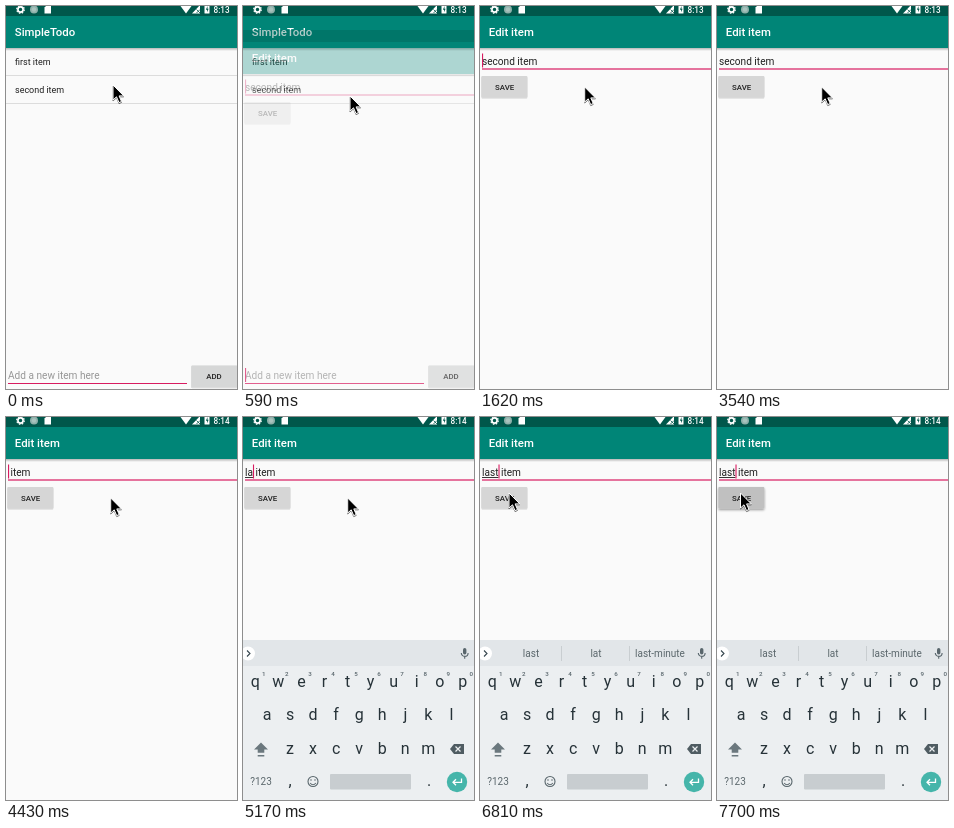
An HTML page for the animation above (8 s loop, 231 by 383 pixels).

```html
<!DOCTYPE html>
<html lang="en">
<head>
<meta charset="utf-8">
<title>Todo list demo</title>
<style>
  html, body { margin: 0; width: 100%; height: 100%; overflow: hidden; background: #fafafa; }
  svg { display: block; width: 231px; height: 383px; }
  text { font-family: Roboto, sans-serif; fill: #212121; white-space: pre; }
  .title { font-size: 11.4px; font-weight: 500; fill: #fff; }
  .row { font-size: 8.98px; }
  .field { font-size: 10.1px; }
  .hint { fill: #979797; }
  .label { font-size: 7.86px; font-weight: 500; text-anchor: middle; }
  .clock { font-size: 8.2px; font-weight: 500; fill: #fff; }
  .key { font-size: 16px; fill: #263238; text-anchor: middle; }
  .digit { font-size: 6.2px; font-weight: 500; fill: #59666c; text-anchor: middle; }
  .word { font-size: 10px; fill: #5b676c; text-anchor: middle; }
  .accent { fill: #d81b60; }
  .icon { fill: none; stroke: #59666c; stroke-width: 1.1; }
</style>
</head>
<body>
<svg viewBox="0 0 231 383">
  <defs>
    <linearGradient id="fade" x2="0" y2="1">
      <stop stop-color="#000" stop-opacity=".27"/>
      <stop offset="1" stop-color="#000" stop-opacity="0"/>
    </linearGradient>
    <filter id="lift" x="-20%" y="-20%" width="140%" height="160%">
      <feDropShadow dx="0" dy=".6" stdDeviation=".7" flood-opacity=".28"/>
    </filter>
    <filter id="lifted" x="-20%" y="-20%" width="140%" height="170%">
      <feDropShadow dx="0" dy="1.4" stdDeviation="1.2" flood-opacity=".42"/>
    </filter>
    <g id="bars">
      <rect y="-2" width="231" height="400" fill="#fafafa"/>
      <rect y="42" width="231" height="3" fill="url(#fade)"/>
      <rect y="10" width="231" height="32" fill="#008577"/>
      <rect y="-2" width="231" height="12" fill="#00574b"/>
    </g>
  </defs>

  <g id="list">
    <use href="#bars"/>
    <text class="title" x="8.8" y="30">SimpleTodo</text>
    <rect id="press" y="70" width="231" height="27" opacity="0"/>
    <text class="row" x="9" y="59">first item</text>
    <text class="row" x="9" y="87">second item</text>
    <path d="M0 69.5H231M0 97.5H231" stroke="#dcdcdc"/>
    <text class="field hint" x="2" y="372.7">Add a new item here</text>
    <rect class="accent" x="2" y="377" width="179" height="1"/>
    <rect class="accent" id="listCaret" x="2" y="362" width="1.1" height="14"/>
    <rect x="185.300" y="359.600" width="46" height="21.600" rx="1" fill="#d6d7d7" filter="url(#lift)"/>
    <text class="label" x="208" y="372.800">ADD</text>
  </g>

  <g id="edit">
    <use href="#bars"/>
    <text class="title" x="8.8" y="30">Edit item</text>
    <text class="field" id="value" x="2" y="58.700"></text>
    <rect id="composing" x="2" y="60" height=".9" fill="#212121"/>
    <rect class="accent" x="2" y="62.4" width="229" height="1.2"/>
    <rect class="accent" id="caret" y="47.5" width="1.1" height="14"/>
    <rect id="save" x="1.400" y="70" width="46" height="21.400" rx="1"/>
    <text class="label" x="24.7" y="83.6">SAVE</text>
  </g>

  <g id="keyboard">
    <rect y="223" width="231" height="160" fill="#eceff1"/>
    <rect y="223" width="231" height="26" fill="#e2e6e9"/>
    <circle cx="5" cy="236.5" r="7" fill="#fff"/>
    <path class="icon" d="M4 233.5l3 3-3 3" style="stroke:#37474f"/>
    <g id="words">
      <text class="word" x="51" y="240">last</text>
      <text class="word" x="116" y="240">lat</text>
      <text class="word" x="180" y="240">last-minute</text>
      <path d="M81.5 229v15M149.5 229v15" stroke="#c9ced1"/>
    </g>
    <rect x="220" y="231" width="3.4" height="6.5" rx="1.7" fill="#59666c"/>
    <path class="icon" d="M218.3 236a3.4 3.4 0 0 0 6.8 0M221.7 239.4v2.4"/>
    <g id="keys"></g>
    <path d="M18 325.500l7 7h-3.700v3.300h-6.600v-3.300H11zM14.700 338h6.600v1.600h-6.600z" fill="#6b787e"/>
    <path d="M207 332l4-5h10v10h-10z" fill="#4f5c62"/>
    <path d="M212.5 329.5l5 5m0-5l-5 5" stroke="#eceff1" stroke-width="1.2"/>
    <text class="word" x="18" y="368">?123</text>
    <text class="key" x="47" y="369">,</text>
    <text class="key" x="186" y="369">.</text>
    <g class="icon">
      <circle cx="70" cy="364.5" r="5"/>
      <path d="M67.2 366q2.8 3.4 5.6 0M68 362.3v1.4M72 362.3v1.4"/>
    </g>
    <rect x="87" y="357" width="81" height="15.5" rx="1" fill="#c8cdd0"/>
    <circle cx="214" cy="365" r="10.2" fill="#45b5aa"/>
    <path d="M218.5 361.5v3.8h-8.5m3-3l-3 3 3 3" fill="none" stroke="#fff" stroke-width="1.3"/>
  </g>

  <g id="status" fill="#fff">
    <circle cx="14.5" cy="3.5" r="2.6" fill="none" stroke="#fff" stroke-width="1.7"/>
    <circle cx="14.5" cy="3.5" r="3.8" fill="none" stroke="#fff" stroke-width="1.2" stroke-dasharray="1.5 1.48"/>
    <circle cx="28" cy="3.5" r="4" fill="#8fb1ab"/>
    <circle cx="28" cy="3.5" r="2.2" fill="#a9c3be"/>
    <path d="M38.5 1.5L40.5-.5H45V7.5H38.5z"/>
    <path d="M174.5 0Q180-3 185.500 0L180 7.5z"/>
    <path d="M194 -1V7.5H186z"/>
    <path d="M190.5 3.5l3.5 3.5m0-3.5l-3.5 3.5" stroke="#00574b" stroke-width=".8"/>
    <rect x="198.5" y="-1" width="5" height="8.5" rx=".6"/>
    <path d="M201.5 0l-1.6 3.7h1.2v2.6l1.5-3.6h-1.1z" fill="#00574b"/>
    <text class="clock" id="clock" x="207.500" y="6.600"></text>
  </g>

  <path id="mouse" d="M0 0V15L3.500 11.800 6 17.600 8.500 16.500 6.100 10.900H10.800Z"
        stroke="#fff" stroke-width="1" style="filter:drop-shadow(.7px 1px .7px #0008)"/>
</svg>

<script>
const LOOP = 8000;
const $ = id => document.getElementById(id);

const start = {
  mouse: [107, 79], press: 0, listCaret: 0,
  fade: 0, shift: 26,
  before: '', after: 'second item', caret: 1, composing: 0,
  clock: '8:13', keyboard: 160, words: 0, save: 0
};

// Each step lists only what changes at that time (ms).
const steps = [
  [150, { mouse: [107, 85] }],
  [290, { mouse: [107, 90], press: .05 }],
  [440, { press: .1, listCaret: 1 }],
  [590, { press: 0, fade: .3 }],
  [730, { fade: 1, shift: 5 }],
  [880, { shift: 0 }],
  [1030, { mouse: [106, 87], caret: 0 }],
  [1180, { mouse: [105.5, 84] }],
  [1320, { mouse: [100, 84] }],
  [1620, { mouse: [104.7, 81], caret: 1 }],
  [2210, { caret: 0 }],
  [2510, { before: 's', after: 'econd item', caret: 1 }],
  [2660, { before: 'se', after: 'cond item' }],
  [2800, { before: 'sec', after: 'ond item' }],
  [2950, { before: 'secon', after: 'd item' }],
  [3100, { before: 'second', after: ' item' }],
  [3540, { caret: 0 }],
  [3690, { before: 'secon', caret: 1, clock: '8:14' }],
  [3980, { before: 'seco' }],
  [4130, { before: 'sec' }],
  [4280, { before: 's' }],
  [4430, { before: '' }],
  [5020, { before: 'l', composing: 1, keyboard: 60 }],
  [5170, { before: 'la', keyboard: 0 }],
  [5320, { before: 'las' }],
  [5470, { before: 'last', words: 1 }],
  [5910, { caret: 0 }],
  [6510, { mouse: [90, 80], caret: 1 }],
  [6660, { mouse: [56, 78] }],
  [6810, { mouse: [29, 76] }],
  [6960, { mouse: [23.5, 76], caret: 0 }],
  [7410, { caret: 1 }],
  [7550, { save: .5 }],
  [7700, { save: 1 }]
];

function addKeys(letters, x, y) {
  [...letters].forEach((letter, i) => {
    const cx = x + i * 23.05;
    let html = `<text class="key" x="${cx}" y="${y}">${letter}</text>`;
    if (letters.length === 10) {
      html += `<text class="digit" x="${cx + 8.5}" y="259">${(i + 1) % 10}</text>`;
    }
    $('keys').insertAdjacentHTML('beforeend', html);
  });
}
addKeys('qwertyuiop', 12.3, 270);
addKeys('asdfghjkl', 24, 303);
addKeys('zxcvbnm', 47, 336.5);

const set = (id, name, value) => $(id).setAttribute(name, value);
const move = (id, x, y) => set(id, 'transform', `translate(${x} ${y})`);

function draw(s) {
  move('mouse', ...s.mouse);
  set('press', 'opacity', s.press);
  set('listCaret', 'opacity', s.listCaret);
  set('edit', 'opacity', s.fade);
  move('edit', 0, s.shift);

  const value = $('value');
  value.textContent = s.before + s.after;
  const width = s.before ? value.getSubStringLength(0, s.before.length) : 0;
  set('caret', 'x', 2 + width);
  set('caret', 'opacity', s.caret);
  set('composing', 'width', s.composing * width);

  const grey = 214 - 22 * s.save;
  set('save', 'fill', `rgb(${grey},${grey},${grey})`);
  set('save', 'filter', s.save ? 'url(#lifted)' : 'url(#lift)');
  $('clock').textContent = s.clock;
  move('keyboard', 0, s.keyboard);
  set('words', 'opacity', s.words);
}

let shown = -1;
const origin = performance.now();
function tick() {
  const t = (performance.now() - origin) % LOOP;
  const past = steps.filter(([at]) => at <= t);
  if (past.length !== shown) {
    shown = past.length;
    draw(Object.assign({}, start, ...past.map(([, change]) => change)));
  }
  requestAnimationFrame(tick);
}
tick();
</script>
</body>
</html>
```
